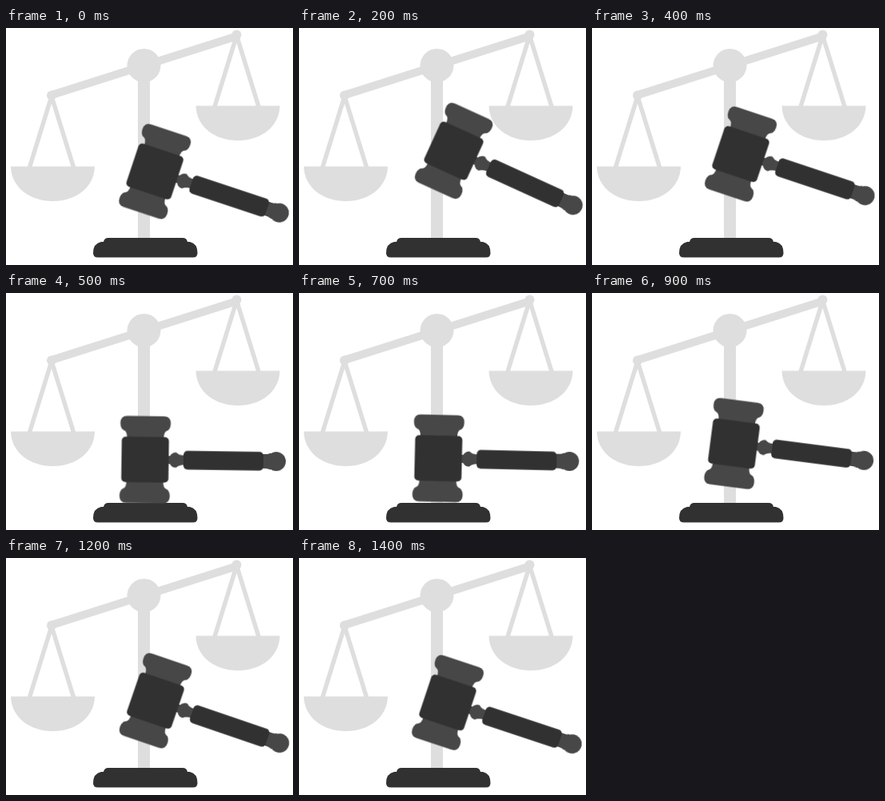
Animation, 359 px wide and 297 px high, one loop 1500 ms. Source, as an HTML page:

```html
<!DOCTYPE html>
<html lang="en">
<head>
<meta charset="utf-8">
<title>Scales and gavel</title>
<style>
  html, body { margin: 0; width: 100%; height: 100%; overflow: hidden; background: #fff; }
  svg { display: block; width: 100vw; height: 100vh; }
  .scales { fill: #dedede; stroke: #dedede; stroke-width: 0; }
  .beam { stroke-width: 10; stroke-linecap: round; }
  .cords { fill: none; stroke-width: 5.5; stroke-linejoin: round; }
  .dark { fill: #313131; }
  .mid { fill: #474747; }
</style>
</head>
<body>
<svg viewBox="0 0 359 297">
  <defs>
    <g id="pan">
      <path class="cords" d="M-29 90L-1.500 1L26 90"/>
      <circle cx="-1.500" r="6"/>
      <path d="M-52.500 89H52.500C52 115 29 132.500 0 132.500S-52 115 -52.500 89Z"/>
    </g>
    <path id="cap" d="M-23 -54.500H23Q31.500 -54.500 31.500 -45.500Q31.500 -38 26 -36Q23 -34 23 -27H-23Q-23 -34 -26 -36Q-31.500 -38 -31.500 -45.500Q-31.500 -54.500 -23 -54.500Z"/>
  </defs>

  <g class="scales">
    <rect x="165" y="40" width="15" height="225"/>
    <path class="beam" d="M57 84L288 10.500"/>
    <circle cx="172.500" cy="47" r="21"/>
    <use href="#pan" x="58.500" y="84.500"/>
    <use href="#pan" x="290" y="8.500"/>
  </g>

  <path class="dark" d="M128 263H221Q226 263 227 268H230Q239.500 270 239.500 282Q239.500 287.500 234 287.500H115Q109 287.500 109 282Q109 270 119 268H122Q123 263 128 263Z"/>

  <g id="gavel">
    <g class="mid">
      <use href="#cap"/>
      <use href="#cap" transform="scale(1 -1)"/>
      <path d="M28 -5H31Q34 -10 39 -9.500Q42 -6 49 -6V6Q42 6 39 9.500Q34 10 31 5H28Z"/>
      <path d="M146 -9H151Q154 -9 157 -10.500V10.500Q154 9 151 9H146Z"/>
      <circle cx="164" r="12"/>
    </g>
    <rect class="dark" x="-29.500" y="-28.500" width="59" height="57" rx="5"/>
    <rect class="dark" x="48" y="-11.700" width="100" height="23.400" rx="5"/>
  </g>
</svg>
<script>
  const STEPS = 15, STEP_MS = 100;

  // Head centre and tilt at a given step, with the easing towards the next pose.
  const pose = (step, x, y, tilt, easing = 'linear') => ({
    offset: step / STEPS,
    transform: `translate(${x}px, ${y}px) rotate(${tilt}deg)`,
    easing
  });
  const rest = [186.2, 179.8, 18.4];
  const hit = [174, 208.8, 0.8];

  document.getElementById('gavel').animate([
    pose(0, ...rest, 'cubic-bezier(.33, .2, .67, .58)'),  // raise
    pose(3, 198.5, 136.5, 28.7),                          // swing down
    pose(4, 186, 158, 18.5),
    pose(5, ...hit),
    pose(6, ...hit, 'cubic-bezier(.33, 0, .67, .2)'),     // rebound
    pose(9, 177.5, 188.7, 7.4, 'cubic-bezier(.33, .45, .67, .85)'),
    pose(12, 187, 178.8, 18.9),                           // settle
    pose(14, 186, 181.2, 18.4),
    pose(15, ...rest)
  ], {
    duration: STEPS * STEP_MS,
    iterations: Infinity,
    easing: `steps(${STEPS}, end)`
  });
</script>
</body>
</html>
```
